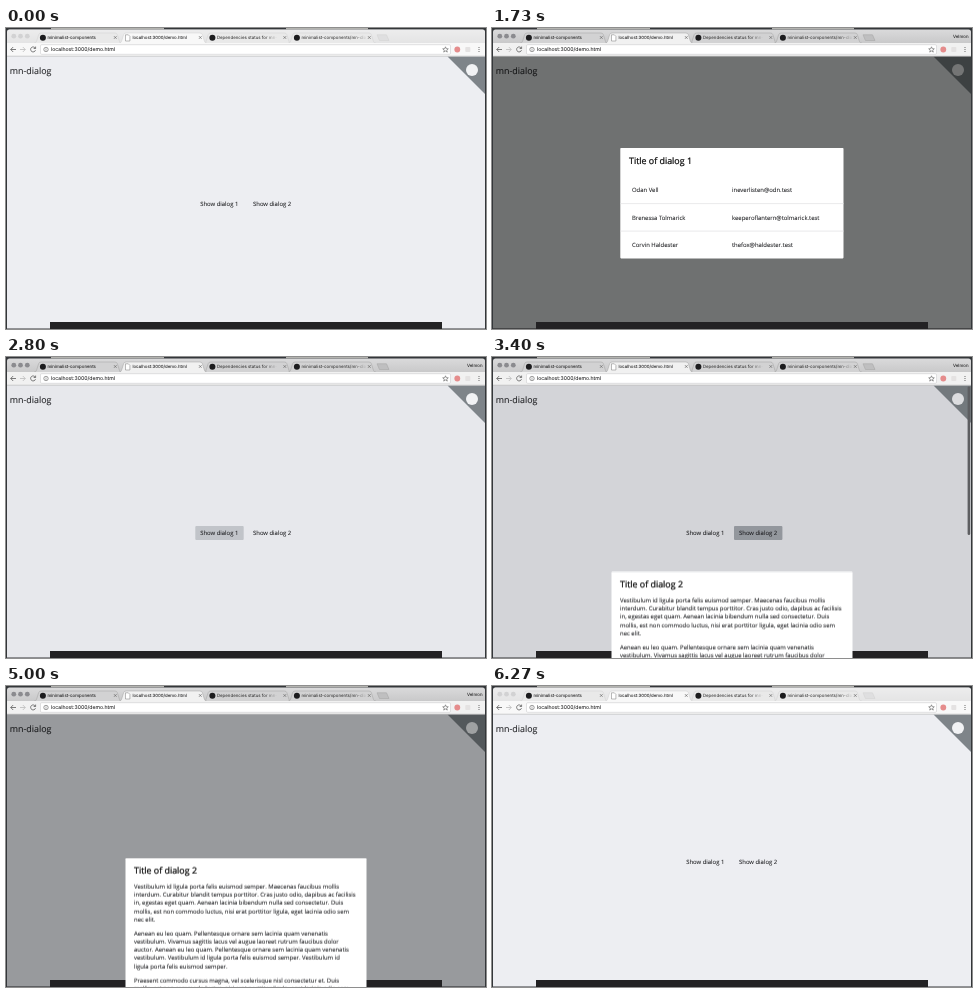
Write an HTML page that moves like this. It is 480 by 301 pixels and loops after 6340 ms.

```html
<!DOCTYPE html>
<html lang="en">
<head>
<meta charset="utf-8">
<title>mn-dialog demo</title>
<style>
  html, body { margin: 0; width: 100%; height: 100%; overflow: hidden; }
  svg { display: block; width: 480px; height: 301px; text-rendering: geometricPrecision; }
  text { font: 5.93px "Open Sans", sans-serif; fill: #202124; stroke: #202124; stroke-width: .08px; white-space: pre; }
  .chrome text { font: 4.4px Inter, sans-serif; fill: #222; stroke-width: .06px; }
  .chrome .cut { fill: url(#fade); stroke: none; }
  .chrome .url { font-size: 5.16px; }
  .heading { font-size: 8.9px; }
  .dialog .heading { fill: #0c0c0c; stroke: #0c0c0c; stroke-width: .24px; }
  .icon { fill: none; stroke: #5c5c5c; stroke-width: .8; }

  .idle, .live, .page, .shade, .dialog, .focus, .scroll { animation: 6340ms linear infinite; }
  .idle { animation-name: idle; animation-timing-function: step-end; }
  .live { animation-name: live; animation-timing-function: step-end; }
  .page { animation-name: page; }
  .shade { animation-name: shade; }
  .scroll { animation-name: scroll; }
  #first { animation-name: first; }
  #second { animation-name: second; }
  #focus1 { animation-name: focus1; }
  #focus2 { animation-name: focus2; }

  @keyframes idle { 0% { opacity: 1 } 1.1% { opacity: 0 } 93.06%, 100% { opacity: 1 } }
  @keyframes live { 0% { opacity: 0 } 1.1% { opacity: 1 } 93.06%, 100% { opacity: 0 } }
  @keyframes page {
    0%, 9.46%, 96.69%, 100% { fill: #edeef2 }
    14.67%, 92.59% { fill: #e7e8ec }
  }
  @keyframes shade {
    0%, 19.35%, 43.19%, 52.81%, 81.39%, 100% { opacity: 0; animation-timing-function: cubic-bezier(.4,.2,.7,1) }
    23.3%, 39.24%, 56.75%, 77.44% { opacity: .52; animation-timing-function: cubic-bezier(.4,.2,.7,1) }
  }
  @keyframes first {
    0%, 19.35%, 43.19%, 100% { transform: translateY(302px); animation-timing-function: cubic-bezier(.2,.4,.7,.9) }
    23.3%, 39.24% { transform: translateY(120px); animation-timing-function: cubic-bezier(.2,.4,.7,.9) }
  }
  @keyframes second {
    0%, 52.81%, 81.39%, 100% { transform: translateY(302px); animation-timing-function: cubic-bezier(.2,.4,.7,.9) }
    56.75%, 77.44% { transform: translateY(38px); animation-timing-function: cubic-bezier(.2,.4,.7,.9) }
  }
  @keyframes focus1 { 0%, 16.8%, 45.3%, 100% { opacity: 0 } 18.5%, 43.2% { opacity: 1 } }
  @keyframes focus2 { 0%, 47.3%, 76%, 100% { opacity: 0 } 49.4%, 70% { opacity: 1 } }
  @keyframes scroll { 0%, 51.8%, 64%, 100% { opacity: 0 } 52.8%, 58.5% { opacity: 1 } }
</style>
</head>
<body>
<svg viewBox="0 0 480 301">
  <defs>
    <linearGradient id="fade">
      <stop offset=".8" stop-color="#222"/>
      <stop offset="1" stop-color="#222" stop-opacity="0"/>
    </linearGradient>
    <linearGradient id="strip" x2="0" y2="1">
      <stop stop-color="#dadadb"/>
      <stop offset=".5" stop-color="#c9c9ca"/>
    </linearGradient>
  </defs>

  <!-- desktop -->
  <rect width="480" height="301" fill="#34373a"/>
  <path d="M45 .6h113M280 .6h82" stroke="#b4b4b0" stroke-width="1.2"/>

  <!-- page -->
  <rect class="page" x="1" y="28" width="478" height="272.5"/>
  <path d="M441.5 28.5H479V66Z" fill="#7e8489"/>
  <circle cx="466" cy="42" r="6" fill="#f1f2f4"/>
  <text class="heading" x="3.8" y="45.6">mn-dialog</text>
  <rect class="focus" id="focus1" x="189.3" y="169" width="48.4" height="14" rx="1" fill="#a1a5ac"/>
  <rect class="focus" id="focus2" x="242" y="169" width="48.4" height="14" rx="1" fill="#a1a5ac"/>
  <text x="194.2" y="178">Show dialog 1</text>
  <text x="247" y="178">Show dialog 2</text>
  <rect class="shade" x="1" y="28" width="478" height="273" fill="#020403"/>
  <rect x="44" y="294" width="392" height="7" fill="#232224"/>
  <rect class="scroll" x="475.6" y="29.5" width="2.6" height="148.5" rx="1.3" fill="#5d5e61"/>

  <g class="dialog" id="first">
    <rect x="128.3" width="223.2" height="110.4" rx=".8" fill="#fff"/>
    <text class="heading" x="137" y="16">Title of dialog 1</text>
    <path d="M128.3 55.6h223.2M128.3 83.1h223.2" stroke="#e4e4e6" stroke-width=".8"/>
  </g>

  <g class="dialog" id="second">
    <rect x="119.5" y="-.5" width="241" height="300" rx=".8" fill="#fff"/>
    <text class="heading" x="128" y="15.2">Title of dialog 2</text>
  </g>

  <!-- browser window -->
  <g class="chrome">
    <path d="M1 28V4q0-2.5 2.5-2.5h473q2.5 0 2.5 2.5V28Z" fill="url(#strip)"/>
    <g id="tabs" stroke="#a0a0a1" stroke-width=".5"></g>
    <rect x="1" y="15" width="478" height="13.2" fill="#f1f1f1"/>
    <path d="M371 6.8h9.5l2.5 5.7h-9.5Z" fill="#bfbfc0" stroke="#a0a0a1" stroke-width=".5"/>
    <path class="idle" d="M1 28V4q0-2.5 2.5-2.5h473q2.5 0 2.5 2.5V28Z" fill="#fff" fill-opacity=".5"/>
    <path d="M1 28.2h478" stroke="#b5b5b6" stroke-width=".6"/>
    <g class="live" fill="#8b8b8f">
      <circle cx="7.8" cy="8.2" r="2.4"/>
      <circle cx="14.5" cy="8.2" r="2.4"/>
      <circle cx="21.3" cy="8.2" r="2.4"/>
      <text x="461" y="9.8">Velmon</text>
    </g>
    <g class="idle" fill="#d2d2d3">
      <circle cx="7.8" cy="8.2" r="2.4"/>
      <circle cx="14.5" cy="8.2" r="2.4"/>
      <circle cx="21.3" cy="8.2" r="2.4"/>
    </g>
    <g id="titles"></g>

    <rect x="34.5" y="16.7" width="410" height="9.6" rx="1.2" fill="#fff" stroke="#c5c5c6" stroke-width=".5"/>
    <path class="icon" d="M10 21.5H4.8M7.2 19L4.7 21.5l2.5 2.5"/>
    <path class="icon" d="M14 21.5h5.2M16.8 19l2.5 2.5-2.5 2.5" style="stroke:#bbb"/>
    <path class="icon" d="M29.3 20.2a2.5 2.5 0 1 0 .2 2M29.6 18.6v1.9h-1.9"/>
    <circle class="icon" cx="40" cy="21.5" r="2.2" style="stroke-width:.6"/>
    <path class="icon" d="M40 21.2v1.5M40 20v.5" style="stroke-width:.6"/>
    <text class="url" x="45" y="23.4">localhost:3000/demo.html</text>
    <path class="icon" d="M439.5 18.8l.8 1.9 2 .1-1.6 1.3.6 2-1.8-1.1-1.8 1.1.6-2-1.6-1.3 2-.1Z" style="stroke-width:.6"/>
    <circle cx="451.3" cy="21.5" r="2.9" fill="#e58c8c"/>
    <rect x="459.3" y="19" width="5" height="5" rx=".8" fill="#e4e2e2"/>
    <g fill="#5c5c5c">
      <circle cx="473" cy="19.5" r=".6"/>
      <circle cx="473" cy="21.5" r=".6"/>
      <circle cx="473" cy="23.5" r=".6"/>
    </g>
  </g>
</svg>
<script>
const byId = id => document.getElementById(id);
const label = (x, y, text, kind = '') => `<text x="${x}" y="${y}" class="${kind}">${text}</text>`;

const tabs = [
  [29, 'minimalist-components'],
  [198.5, 'Dependencies status for mn-', 'cut'],
  [283, 'minimalist-components/mn-dia', 'cut'],
  [114, 'localhost:3000/demo.html']
];
let shapes = '', titles = '';
tabs.forEach(([x, title, kind], i) => {
  const current = i === 3;
  shapes += `<path d="M${x - 1} 15.2q2 0 2.6-2l2-6.5q.6-1.7 2.4-1.7h74q1.8 0 2.4 1.7l2 6.5q.6 2 2.6 2"
    fill="${current ? '#f1f1f1' : '#d2d2d3'}"/>`;
  titles += current
    ? `<path d="M${x + 5.5} 6.8h2.8l1.6 1.6v4.6h-4.4Z" fill="#fff" stroke="#777" stroke-width=".5"/>`
    : `<circle cx="${x + 7.9}" cy="9.8" r="3" fill="#1c1c1e"/>`;
  titles += label(x + 12.4, 11.3, title, kind);
  titles += `<path d="M${x + 79} 8.2l2.6 2.6m0-2.6l-2.6 2.6" stroke="#666" stroke-width=".7"/>`;
});
byId('tabs').innerHTML = shapes;
byId('titles').innerHTML = titles;

const people = [
  ['Odan Vell', 'ineverlisten@odn.test'],
  ['Brenessa Tolmarick', 'keeperoflantern@tolmarick.test'],
  ['Corvin Haldester', 'thefox@haldester.test']
];
byId('first').innerHTML += people.map(([name, mail], i) => {
  const y = 44.1 + i * 27.5;
  return label(140, y, name) + label(240, y, mail);
}).join('');

const story = `Vestibulum id ligula porta felis euismod semper. Maecenas faucibus mollis
interdum. Curabitur blandit tempus porttitor. Cras justo odio, dapibus ac facilisis
in, egestas eget quam. Aenean lacinia bibendum nulla sed consectetur. Duis
mollis, est non commodo luctus, nisi erat porttitor ligula, eget lacinia odio sem
nec elit.

Aenean eu leo quam. Pellentesque ornare sem lacinia quam venenatis
vestibulum. Vivamus sagittis lacus vel augue laoreet rutrum faucibus dolor
auctor. Aenean eu leo quam. Pellentesque ornare sem lacinia quam venenatis
vestibulum. Vestibulum id ligula porta felis euismod semper. Vestibulum id
ligula porta felis euismod semper.

Praesent commodo cursus magna, vel scelerisque nisl consectetur et. Duis
mollis, est non commodo luctus, nisi erat porttitor ligula, eget lacinia odio sem
nec elit. Nullam id dolor id nibh ultricies vehicula ut id elit. Cum sociis natoque
penatibus et magnis dis parturient montes, nascetur ridiculus mus. Donec id elit
non mi porta gravida at eget metus. Integer posuere erat a ante venenatis
dapibus posuere velit aliquet.

Cras mattis consectetur purus sit amet fermentum. Cras mattis consectetur
purus sit amet fermentum. Cum sociis natoque penatibus et magnis dis
parturient montes, nascetur ridiculus mus. Nulla vitae elit libero, a pharetra
augue. Curabitur blandit tempus porttitor. Fusce dapibus, tellus ac cursus
commodo, tortor mauris condimentum nibh, ut fermentum massa justo sit
amet risus. Donec ullamcorper nulla non metus auctor fringilla.

Fusce dapibus, tellus ac cursus commodo, tortor mauris condimentum nibh, ut
fermentum massa justo sit amet risus. Cum sociis natoque penatibus et magnis
dis parturient montes, nascetur ridiculus mus. Maecenas sed diam eget risus
varius blandit sit amet non magna. Praesent commodo cursus magna, vel`;
let y = 30.1, lines = '';
for (const line of story.split('\n')) {
  if (line) lines += label(128, y, line);
  y += line ? 8.18 : 5.93;
}
byId('second').innerHTML += lines;
</script>
</body>
</html>
```
